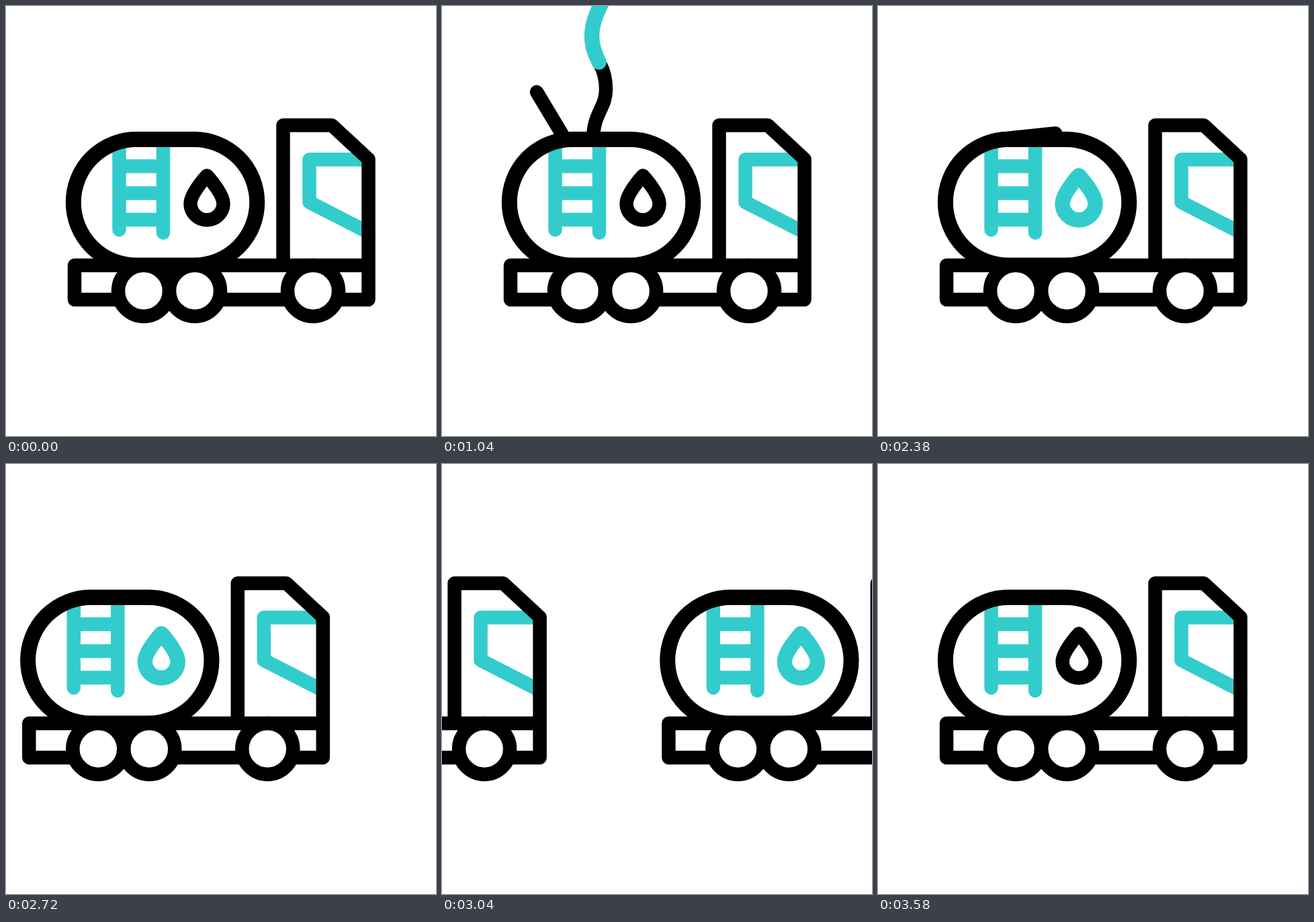
An HTML page that plays this animation: 640 by 640 pixels, repeating every 3600 ms.

```html
<!DOCTYPE html>
<html lang="en">
<head>
<meta charset="utf-8">
<title>Tanker truck</title>
<style>
  html, body { margin: 0; width: 100%; height: 100%; overflow: hidden; background: #fff; }
  svg { display: block; width: 100%; height: 100%; }
  .line { fill: none; stroke: #000; stroke-width: 20.5; stroke-linecap: round; stroke-linejoin: round; }
  .teal { stroke: #33cccc; }
  .wide { stroke-width: 22.5; }
</style>
</head>
<body>
<svg viewBox="0 0 640 640">
  <defs>
    <path id="dropPath" pathLength="1" d="M299 252.5C305 259 323.5 281 323.5 294A24.5 24.5 0 0 1 274.5 294C274.5 281 293 259 299 252.5Z"/>
    <path id="hosePath" pathLength="1" d="M262 -50C250 -22 223 10 223 45C223 62 229 75 235 86C241 97 244 108 244 124C244 152 225 160 225 198"/>
    <g id="truck" class="line">
      <path class="teal" d="M168.5 205V333M234 205V337.5M168.5 238.5H234M168.5 278.5H234M168.5 318H234"/>
      <path class="teal" d="M535 228.5H451.5V292L539.5 337"/>
      <rect x="100.3" y="198.5" width="273.4" height="187.5" rx="93.75" stroke-width="23"/>
      <use href="#dropPath"/>
      <path d="M412.5 386V177.5H485L539.5 228V437H102V386H539.5"/>
      <g fill="#fff">
        <circle cx="205" cy="424" r="38"/>
        <circle cx="281" cy="424" r="38"/>
        <circle cx="457" cy="424" r="38"/>
      </g>
    </g>
  </defs>
  <g class="line">
    <use id="hose" href="#hosePath"/>
    <use id="flow" class="teal wide" href="#hosePath"/>
  </g>
  <g id="leaving">
    <use href="#truck"/>
    <g class="line">
      <path id="lid" d="M183 198H264.5"/>
      <use id="drop" class="teal wide" href="#dropPath"/>
    </g>
  </g>
  <use id="arriving" href="#truck"/>
</svg>
<script>
  const LOOP = 3600;
  const [hose, flow, leaving, lid, drop, arriving] =
    ['hose', 'flow', 'leaving', 'lid', 'drop', 'arriving'].map(id => document.getElementById(id));

  // Eased progress from 0 to 1 between two times
  function ease(t, start, end) {
    const u = Math.min(1, Math.max(0, (t - start) / (end - start)));
    return u * u * (3 - 2 * u);
  }

  function trim(el, part) {
    el.style.visibility = part > 0 ? 'visible' : 'hidden';
    el.style.strokeDasharray = part < 1 ? `${part} 3` : 'none';
  }

  function shift(el, x) {
    el.setAttribute('transform', `translate(${x} 0)`);
  }

  function draw(now) {
    const t = now % LOOP;
    const retract = ease(t, 1360, 2040);
    trim(hose, ease(t, 0, 680) - retract);
    trim(flow, ease(t, 680, 1360) - retract);
    trim(drop, ease(t, 1430, 1960));

    const open = ease(t, 0, 490) - ease(t, 1960, 2447);
    lid.setAttribute('transform', `rotate(${-121 * open} 183 198)`);

    // Roll back a little, then drive off while the next truck pulls in
    shift(leaving, -76 * ease(t, 2440, 2670) + 656 * ease(t, 2670, 3438));
    shift(arriving, -790 * (1 - ease(t, 2500, 3580)));
    requestAnimationFrame(draw);
  }
  requestAnimationFrame(draw);
</script>
</body>
</html>
```
